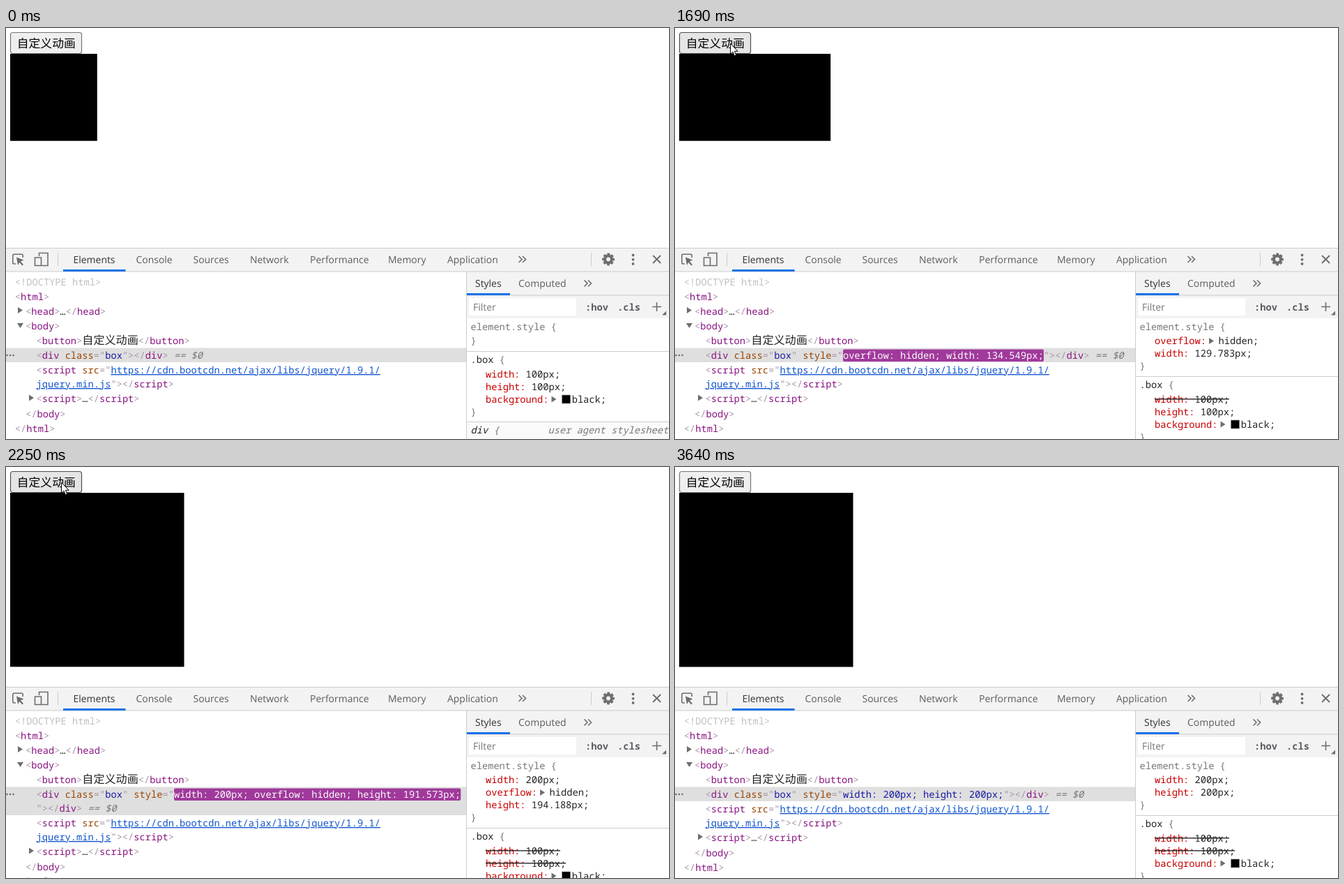
An HTML page for the animation above (3.87 s loop, 951 px wide and 589 px high).

```html
<!DOCTYPE html>
<html lang="zh">
<head>
<meta charset="utf-8">
<title>自定义动画</title>
<style>
html, body { margin: 0; width: 100%; height: 100%; overflow: hidden; background: #fff; }
svg { display: block; text-rendering: geometricPrecision; }
text { white-space: pre; }
.ui { font: 13.95px "Open Sans", "Noto Sans", sans-serif; fill: #5a5d61; }
.ui .on { fill: #333; }
.code { font: 13.71px "Noto Sans Mono", "DejaVu Sans Mono", monospace; fill: #222; }
.cjk { font-family: "Noto Sans CJK SC", "Noto Sans CJK", sans-serif; }
.bold { font-weight: 600; fill: #5a5d61; }
.doctype { fill: #c0c0c0; }
.mark { fill: #a894a6; }
.tag { fill: #881280; }
.name { fill: #994500; }
.value { fill: #1a1aa6; }
.link { fill: #15c; text-decoration: underline; }
.dim { fill: #777; }
.it { font-style: italic; }
.prop { fill: #c80000; }
.cut { text-decoration: line-through; }
.tri { fill: #6e6e6e; }
.icon { fill: none; stroke: #6e6e6e; stroke-width: 1.6; }
.glow, .ink { animation: glow 1.4s paused both; animation-delay: calc(var(--age) * -1ms); }
.ink { animation-name: ink; }
@keyframes glow {
  from { fill: rgb(158 54 153); }
  80% { fill: rgb(245 219 244); }
  to { fill: rgb(245 219 244 / 0); }
}
@keyframes ink {
  from { fill: #fff; }
  80% { fill: #a894a6; }
  to { fill: #1a1aa6; }
}
</style>
</head>
<body>
<svg width="951" height="589" viewBox="0 0 951 589">
  <rect id="button" x="6.5" y="6.5" width="102" height="30" rx="3" stroke-width="1.2"/>
  <text class="cjk" x="15.8" y="28.2" font-size="16.8">自定义动画</text>
  <rect id="box" x="6" y="37"/>

  <g id="tree" class="code"></g>

  <path fill="#f3f3f3" d="M0 315H951V349H0zM661 349H951V416H661z"/>
  <path fill="none" stroke="#ccc" d="M0 315.5H951M0 349H951M660.5 349V589M661 383H951M74.5 322V341M839.5 322V341"/>
  <path fill="#fff" d="M664 387H818V412H664z"/>
  <path fill="#1a73e8" d="M82 346H171.500V349H82zM661 380H723V383H661z"/>
  <g class="ui">
    <text class="on" x="96.500" y="337">Elements</text>
    <text x="186.500" y="337">Console</text>
    <text x="268.500" y="337">Sources</text>
    <text x="350" y="337">Network</text>
    <text x="436" y="337">Performance</text>
    <text x="548" y="337">Memory</text>
    <text x="633" y="337">Application</text>
    <text class="on" x="673" y="371">Styles</text>
    <text x="735" y="371">Computed</text>
    <text x="670" y="405" fill="#757575">Filter</text>
  </g>
  <g class="code">
    <text class="bold" x="831" y="404.500">:hov</text>
    <text class="bold" x="877" y="404.500">.cls</text>
  </g>
  <g class="icon">
    <path d="M14 338H11.500Q9.800 338 9.800 336.300V326Q9.800 324.300 11.500 324.300H22.500Q24.200 324.300 24.200 326V329"/>
    <path d="M47.500 327V322.500H60V340.500H51M41.500 329H50.500V340.500H41.500z"/>
    <path d="M735.500 327L740 331.500 735.500 336M741 327L745.500 331.500 741 336M829.500 361.500L834 366 829.500 370.500M835 361.500L839.500 366 835 370.500"/>
    <path d="M928 326L939 337M939 326L928 337" stroke-width="1.9"/>
    <path d="M927 399.500H940M933.500 393V406"/>
    <circle cx="864" cy="331.500" r="5" stroke-width="4.200"/>
    <circle cx="864" cy="331.500" r="7.700" stroke-width="2.400" stroke-dasharray="3.800 2.247" stroke-dashoffset="1.900"/>
  </g>
  <g class="tri">
    <path d="M15 328.500L25.500 332.500 21 334.500 25 339 23.300 340.500 19.300 336 17 340z"/>
    <path d="M947 405.500V411.500H941z"/>
    <circle cx="899.500" cy="325.500" r="1.900"/>
    <circle cx="899.500" cy="331.800" r="1.900"/>
    <circle cx="899.500" cy="338" r="1.900"/>
  </g>

  <g id="styles" class="code"></g>

  <path id="cursor" d="M.5 .5V16L4 12.700 6.300 18.300 8.700 17.300 6.400 11.800H11z" fill="#fff" stroke="#000" stroke-linejoin="round"/>
  <circle id="press" cx="78" cy="22" r="15" fill="#f2e832" opacity=".7"/>
</svg>
<script>
const LOOP = 3870, SCALE = 1.2475, CHAR = 8.226;
const WIDTH_AT = 1426, HEIGHT_AT = 1859;
const ticks = [0, 460, 540, 610, 690, 760, 840, 910, 990, 1070,
  1380, 1460, 1540, 1610, 1690, 1770, 1850, 1950, 2000, 2080, 2160, 2250, 2340, 2400,
  2480, 2560, 2640, 2710, 2790, 2860, 2940, 3040, 3110, 3170, 3320, 3400, 3480, 3560, 3640];

const $ = id => document.getElementById(id);
const clamp = v => Math.min(1, Math.max(0, v));
const smooth = u => u * u * (3 - 2 * u);
const swing = ms => 100 + 100 * (0.5 - Math.cos(clamp(ms / 400) * Math.PI) / 2);
const widthAt = t => swing(t - WIDTH_AT);
const heightAt = t => swing(t - HEIGHT_AT);
const px = v => +v.toFixed(3) + 'px';

const span = (cls, s) => `<tspan class="${cls}">${s.replace(/</g, '&lt;')}</tspan>`;
const text = (x, y, s, cls = '') => `<text class="${cls}" x="${x}" y="${y + 4.5}">${s}</text>`;
const open = (tag, attrs = '') => span('mark', '<') + span('tag', tag) + attrs + span('mark', '>');
const close = tag => span('mark', '</') + span('tag', tag) + span('mark', '>');
const attrStart = (name, val) => ' ' + span('name', name) + span('mark', '="') + val;
const quote = span('mark', '"');
const right = (x, y) => `<path class="tri" d="M${x} ${y - 4.5}L${x + 7} ${y}L${x} ${y + 4.5}z"/>`;
const rect = (x, y, w, h, attrs) => `<rect x="${x}" y="${y}" width="${w}" height="${h}" ${attrs}/>`;

function inlineStyle(t) {
  if (t < 1540) return '';
  if (t < 1950) return `overflow: hidden; width: ${px(widthAt(t - 104))};`;
  if (t < 2340) return `width: 200px; overflow: hidden; height: ${px(heightAt(t < 2000 ? 0 : t - 66))};`;
  return 'width: 200px; height: 200px;';
}

function tree(t) {
  const css = inlineStyle(t), X = [12.8, 28, 43.5];
  const wrap = css.length > 40, dy = wrap ? 20 : 0;
  let head = span('mark', '<') + span('tag', 'div') + attrStart('class', span('value', 'box')) + quote;
  let tail = close('div') + span('dim it', ' == $0');
  const end = span('mark', '>');
  if (css) head += attrStart('style', span('ink', css));
  const shut = (css ? quote : '') + end;
  if (css.length > 47) tail = shut + tail; else head += shut;

  let out = rect(0, 458.5, 660, 20.5 + dy, 'fill="#dfdfdf"');
  if (css) out += rect(241, 460.5, css.length * CHAR, 17.5, 'rx="2" class="glow"');
  for (const x of [1.5, 6, 10.5]) out += `<circle class="tri" cx="${x}" cy="469" r="1.3"/>`;
  out += text(X[0], 364, span('doctype', '<!DOCTYPE html>'))
    + text(X[0], 385, open('html'))
    + right(17, 404.5) + text(X[1], 406, open('head') + '…' + close('head'))
    + '<path class="tri" d="M16 423H25L20.5 430z"/>' + text(X[1], 427, open('body'))
    + text(X[2], 448, open('button') + '<tspan class="cjk" font-size="16.1">自定义动画</tspan>' + close('button'))
    + (wrap ? text(X[2], 469, head) + text(X[2], 489.5, tail) : text(X[2], 469, head + tail))
    + text(X[2], 490.5 + dy, span('mark', '<') + span('tag', 'script')
      + attrStart('src', span('link', 'https://cdn.bootcdn.net/ajax/libs/jquery/1.9.1/')))
    + text(X[2], 510.5 + dy, span('link', 'jquery.min.js') + quote + end + close('script'))
    + right(33, 530 + dy) + text(X[2], 531.5 + dy, open('script') + '…' + close('script'))
    + text(X[1], 553 + dy, close('body'))
    + text(X[0], 574 + dy, close('html'));
  return out;
}

function ownRules(t) {
  if (t < 1540) return [];
  if (t < 2000) return [['overflow', 'hidden'], ['width', px(widthAt(Math.min(t - 117, 1690)))]];
  if (t < 2340) return [['width', '200px'], ['overflow', 'hidden'], ['height', px(heightAt(t - 53))]];
  return [['width', '200px'], ['height', '200px']];
}

function rule(y, [name, val], cut) {
  const label = span('prop', name + ':');
  const after = 688 + (name.length + 1) * CHAR;
  if (name === 'overflow') return text(688, y, label) + right(after + 4, y) + text(after + 17.5, y, val + ';');
  if (name === 'background') return text(688, y, label) + right(after + 4, y)
    + rect(797.5, y - 6, 12, 12, 'fill="#000" stroke="#888" stroke-width=".6"') + text(after + 33.2, y, val + ';');
  return text(688, y, label + ` ${val};`, cut ? 'cut' : '');
}

function styles(t) {
  const own = ownRules(t), dy = own.length * 18;
  const set = name => own.some(r => r[0] === name);
  const sep = y => `<path stroke="#ccc" d="M661 ${y}H951"/>`;
  let out = rect(661, 565 + dy, 290, 40, 'fill="#fafafa"')
    + text(666.5, 428.5, 'element.style {', 'dim')
    + text(666.5, 448.5 + dy, '}', 'dim') + sep(463.5 + dy)
    + text(666.5, 475.5 + dy, '.box ' + span('dim', '{'))
    + text(666.5, 550.5 + dy, '}', 'dim') + sep(564.5 + dy)
    + text(666.5, 576.5 + dy, 'div ' + span('dim', '{'), 'it')
    + text(777.5, 576.5 + dy, 'user agent stylesheet', 'dim it');
  own.forEach((r, i) => out += rule(448.5 + 18 * i, r));
  [['width', '100px'], ['height', '100px'], ['background', 'black']]
    .forEach((r, i) => out += rule(496 + dy + 18 * i, r, set(r[0])));
  return out;
}

function pointer(t) {
  if (t < 460 || t >= 3400) return null;
  if (t < 990) {
    const u = smooth((t - 460) / 450);
    return [842 - 744 * u, 2 + 16 * u];
  }
  if (t < 1070) return [86, 20];
  if (t < 2480) return [79, 21.5];
  if (t < 3040) {
    const u = smooth(clamp((t - 2400) / 540)), v = 1 - u;
    const bend = (a, b, c) => v * v * a + 2 * u * v * b + u * u * c;
    return [bend(79, 450, 920), bend(21, -5, 72)];
  }
  if (t < 3320) return [920, 72 + 383 * clamp((t - 2940) / 230)];
  return [928, 575];
}

function draw(t) {
  const p = pointer(t);
  const pressed = t >= 1380 && t < 1460;
  const hover = p && p[0] < 109 && p[0] > 6 && p[1] < 37 && t >= 990;
  const [fill, edge] = pressed ? ['#f5f5f5', '#8d8d8d'] : hover ? ['#e5e5e5', '#4f4f4f'] : ['#efefef', '#767676'];
  $('button').setAttribute('fill', fill);
  $('button').setAttribute('stroke', edge);
  $('box').setAttribute('width', widthAt(t) * SCALE);
  $('box').setAttribute('height', heightAt(t) * SCALE);
  $('press').style.display = pressed ? '' : 'none';
  $('cursor').style.display = p ? '' : 'none';
  if (p) $('cursor').setAttribute('transform', `translate(${p})`);
  $('tree').style.setProperty('--age', t < 2340 ? 40 : t - 2240);
  $('tree').innerHTML = tree(t);
  $('styles').innerHTML = styles(t);
}

const start = performance.now();
let shown = -1;
function loop() {
  const t = (performance.now() - start) % LOOP;
  const tick = ticks.findLast(s => s <= t);
  if (tick !== shown) draw(shown = tick);
  requestAnimationFrame(loop);
}
loop();
</script>
</body>
</html>
```
